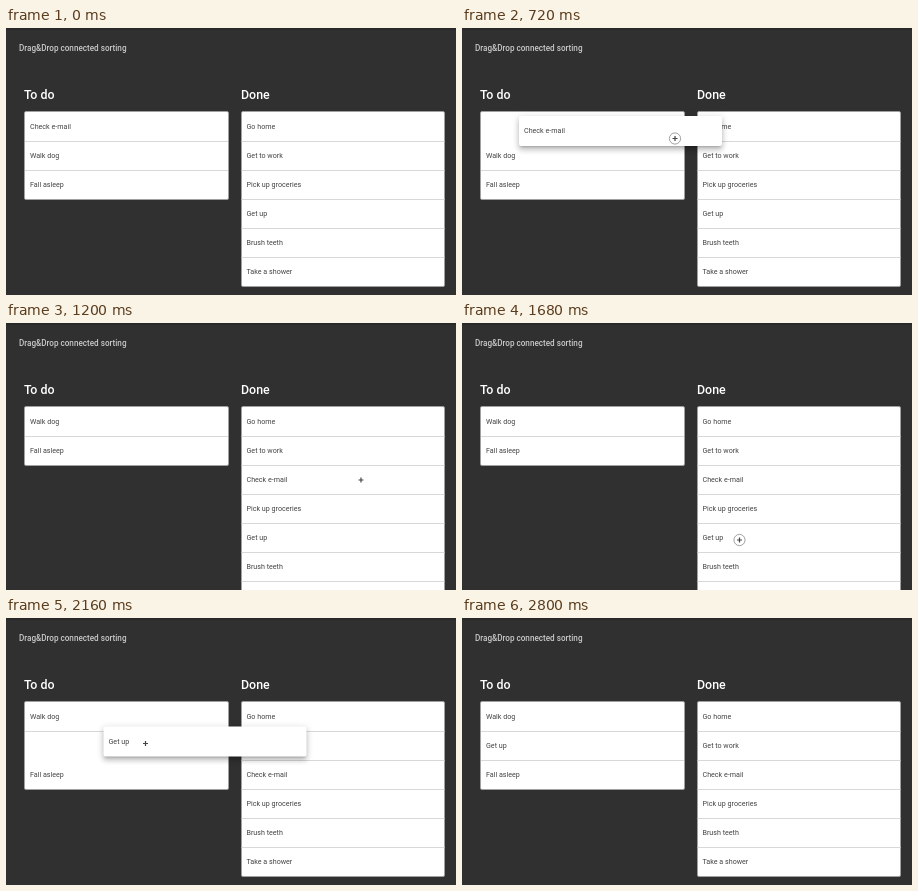
These frames come from a looping animation (450x267 px, 2.96 s). An HTML page:

```html
<!DOCTYPE html>
<html lang="en">
<head>
<meta charset="utf-8">
<title>Drag&amp;Drop connected sorting</title>
<style>
html, body { margin: 0; width: 100%; height: 100%; overflow: hidden; background: #303030; }
body { font-family: Roboto, sans-serif; }
#stage { position: relative; width: 450px; height: 267px; overflow: hidden; background: #303030; }
#stage::before {
  content: ""; position: absolute; left: 0; top: 0; width: 100%; height: 3px;
  background: linear-gradient(#262626, #303030);
}
h1, h2 { position: absolute; margin: 0; white-space: nowrap; }
h1 { left: 13px; top: 14px; font-size: 8.15px; line-height: 12px; font-weight: 500; color: #c8c8c8; }
h2 { top: 58px; font-size: 12.4px; line-height: 17px; font-weight: 500; color: #fff; }
.list {
  position: absolute; top: 83px; width: 204.3px; box-sizing: border-box;
  background: #fff; border: 1px solid #a0a0a0; border-radius: 2px;
}
.row {
  position: absolute; left: 0; top: 0; width: 203px; height: 29px; padding-left: 5px; box-sizing: border-box;
  font-size: 7.15px; line-height: 29px; color: rgba(0, 0, 0, .74); white-space: nowrap;
}
.row::after {
  content: ""; position: absolute; left: 0; top: 29px; width: 100%; height: 1px; background: #d8d8d8;
}
.row:not(.drag).last::after, .row.drag::after { display: none; }
.row.drag {
  z-index: 2; height: 30px; line-height: 30px; background: #fff; border-radius: 2px;
  box-shadow: 0 2.5px 2.5px -1.5px rgba(0, 0, 0, .2), 0 4px 5px .5px rgba(0, 0, 0, .14), 0 1.5px 7px 1px rgba(0, 0, 0, .12);
}
#cursor { position: absolute; left: 0; top: 0; z-index: 3; overflow: visible; }
</style>
</head>
<body>
<div id="stage">
  <h1>Drag&amp;Drop connected sorting</h1>
  <h2 style="left:18px">To do</h2>
  <h2 style="left:235px">Done</h2>
  <div class="list" style="left:18.3px"></div>
  <div class="list" style="left:234.7px"></div>
  <svg id="cursor" width="1" height="1">
    <circle id="ring" r="5.6" fill="#fff" fill-opacity=".85" stroke="#8a8a8a" stroke-width=".8"/>
    <path id="move" d="M-2.5 0H2.5M0-2.5V2.5" stroke="#444" stroke-width="1.2"/>
    <path id="arrow" d="M0 0V7.6L1.8 6 3 8.7 4.3 8.1 3.1 5.5H5.5Z" fill="#000" stroke="#ddd" stroke-width=".6"/>
  </svg>
</div>
<script>
const LOOP = 2960, STEP = 80, ROW = 29, TOP = 84, LEFT = [19, 235.5], DROP = 160;
const $ = id => document.getElementById(id);
const names = {
  c: 'Check e-mail', w: 'Walk dog', f: 'Fall asleep', h: 'Go home', k: 'Get to work',
  p: 'Pick up groceries', u: 'Get up', b: 'Brush teeth', s: 'Take a shower'
};

// Order of both lists from a given time on
const SWAP = 862;
const orders = [
  [0, 'cwf', 'hkpubs'],
  [800, 'wf', 'hckpubs'],
  [SWAP, 'wf', 'hkcpubs'],
  [2080, 'wuf', 'hkcpbs']
];

// Key points of the pointer: time, x, y
const pointer = [
  [320, 178, 116], [480, 175, 106.5], [720, 213, 110.5], [960, 322.5, 143.5], [1040, 355, 157],
  [1280, 355, 157], [1680, 277.5, 217], [1920, 217, 207.5], [2160, 139.5, 125.5],
  [2480, 139.5, 125.5], [2720, 210, 257]
];
const drags = [
  { id: 'c', press: 440, lift: 480, drop: 1040 },
  { id: 'u', press: 1600, lift: 1680, drop: 2160 }
];

const within = (t, a, b) => t >= a && t < b;
const mix = (a, b, k) => a.map((v, i) => v + (b[i] - v) * k);

function pointerAt(t) {
  const next = pointer.findIndex(p => p[0] >= t);
  if (next < 1) return pointer.at(next).slice(1);
  const a = pointer[next - 1], b = pointer[next];
  return mix(a, b, (t - a[0]) / (b[0] - a[0])).slice(1);
}

// cubic-bezier(0, 0, .2, 1), solved by bisection
function settle(x) {
  if (x >= 1) return 1;
  let lo = 0, hi = 1;
  for (let i = 0; i < 20; i++) {
    const s = (lo + hi) / 2;
    if (.6 * (1 - s) * s * s + s ** 3 < x) lo = s; else hi = s;
  }
  return lo * lo * (3 - 2 * lo);
}

const orderAt = t => orders.filter(o => t >= o[0]).pop();

// Resting place of a row at a given time
function slot(id, t) {
  const [, left, right] = orderAt(t);
  const side = left.includes(id) ? 0 : 1;
  return [LEFT[side], TOP + [left, right][side].indexOf(id) * ROW];
}

function dragged({ id, lift, drop }, t) {
  const home = slot(id, lift), grab = pointerAt(lift), now = pointerAt(Math.min(t, drop));
  const held = home.map((v, i) => v + now[i] - grab[i]);
  return mix(held, slot(id, t), settle(Math.max(0, t - drop) / DROP));
}

const lists = document.querySelectorAll('.list');
const rows = {};
for (const id in names) {
  const el = rows[id] = document.createElement('div');
  el.className = 'row';
  el.textContent = names[id];
  $('stage').insertBefore(el, $('cursor'));
}

const place = (el, [x, y]) => el.style.transform = `translate(${x}px, ${y}px)`;
const show = (el, on) => el.style.display = on ? '' : 'none';

function drawRows(t) {
  const order = orderAt(t).slice(1);
  lists.forEach((list, i) => list.style.height = order[i].length * ROW + 2 + 'px');
  for (const id in rows) {
    const drag = drags.find(d => d.id === id && t > d.lift && t < d.drop + DROP);
    const pos = drag ? dragged(drag, t) : slot(id, t);
    if (id === 'k' && t >= SWAP) pos[1] += ROW * (1 - settle((t - SWAP) / 200));
    rows[id].classList.toggle('drag', !!drag);
    rows[id].classList.toggle('last', order.some(ids => ids.endsWith(id)));
    place(rows[id], pos);
  }
}

function drawCursor(t) {
  const early = within(t, 80, 160), arrow = early || t >= 2640;
  show($('cursor'), early || within(t, 320, 2800));
  show($('arrow'), arrow);
  show($('move'), !arrow);
  show($('ring'), drags.some(d => within(t, d.press, d.drop)));
  place($('cursor'), early ? [191, 248] : pointerAt(t));
}

function frame(now) {
  const t = Math.floor(now % LOOP / STEP) * STEP;
  drawRows(t);
  drawCursor(t);
  requestAnimationFrame(frame);
}
frame(0);
</script>
</body>
</html>
```
